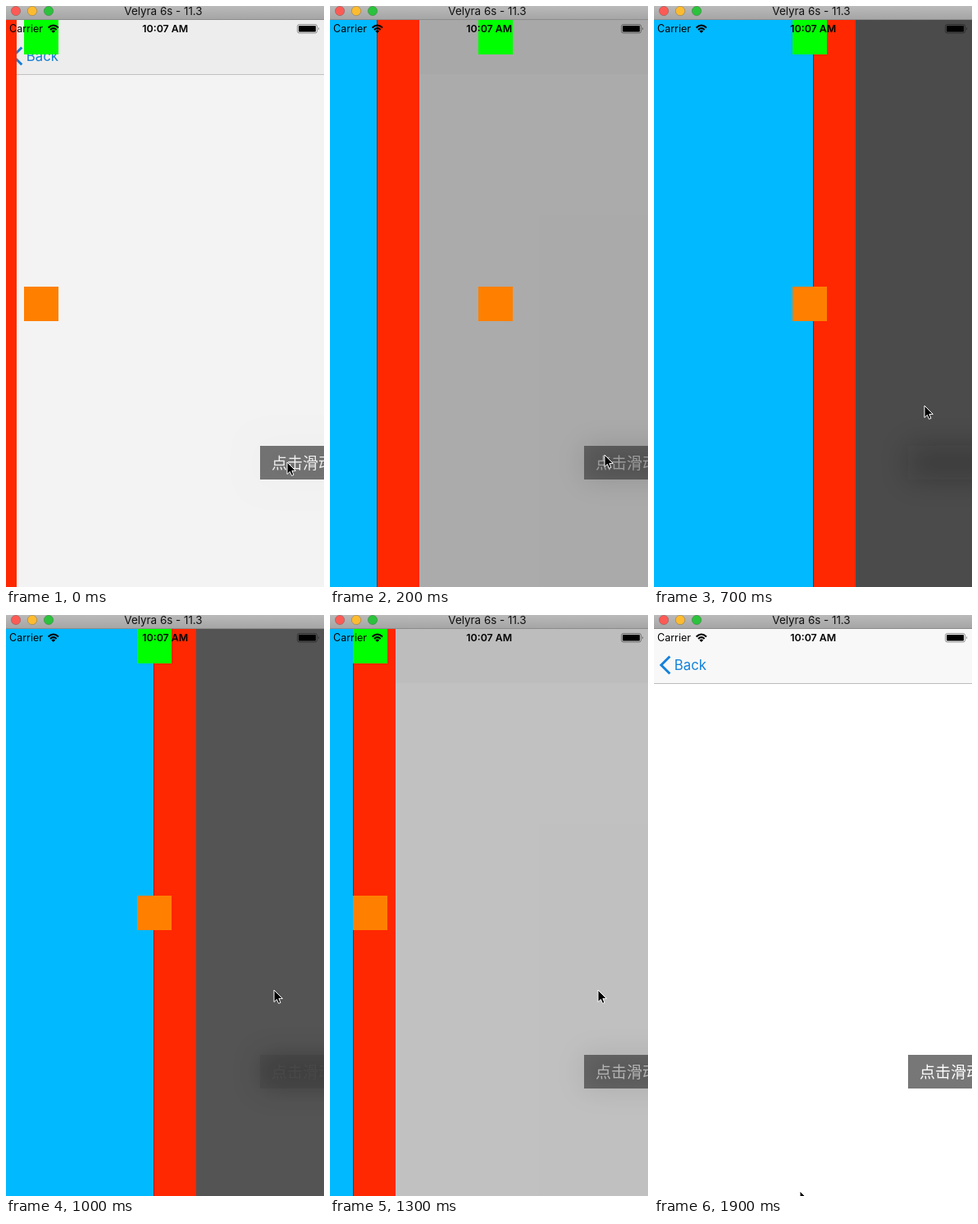
An HTML page for the animation above (2 s loop, 388 by 708 pixels).

```html
<!DOCTYPE html>
<html lang="en">
<head>
<meta charset="utf-8">
<title>Elastic drawer</title>
<style>
  html, body { margin: 0; width: 100%; height: 100%; overflow: hidden; background: #fff; }
  svg { display: block; width: 388px; height: 708px; }
  text { font-family: Inter, sans-serif; }
  .button-label { font: 19px "Noto Sans CJK SC", "Noto Sans CJK", sans-serif; }
</style>
</head>
<body>
<svg viewBox="0 0 388 708">
  <defs>
    <linearGradient id="chrome" x2="0" y2="1">
      <stop stop-color="#bababa"/>
      <stop offset="1" stop-color="#a4a4a4"/>
    </linearGradient>
    <filter id="soft" filterUnits="userSpaceOnUse" x="220" y="450" width="260" height="210">
      <feGaussianBlur stdDeviation="17"/>
    </filter>
  </defs>

  <rect width="388" height="708" fill="#fff"/>

  <g id="page">
    <rect y="17" width="388" height="66" fill="#f8f8f8"/>
    <rect id="hairline" y="83" width="388" height="1" fill="#bcbcbc"/>
    <path d="M19.3 50.5 8.8 61 19.3 71.5" fill="none" stroke="#1482dc" stroke-width="3"/>
    <text x="24.8" y="67" font-size="16.8" fill="#1482dc">Back</text>
    <rect x="310" y="536" width="90" height="41" fill="#777"/>
    <text class="button-label" x="324" y="564" fill="#fff">点击滑动</text>
  </g>

  <g id="dim">
    <rect y="17" width="388" height="691" fill="#4b4b4b"/>
    <rect id="shadow" x="310" y="536" width="130" height="41" fill="#111" filter="url(#soft)"/>
  </g>

  <g id="drawer">
    <rect x="-246" y="17" width="194" height="691" fill="#00b9ff"/>
    <rect x="-52" y="17" width="52" height="691" fill="#ff2800"/>
    <rect x="-52" y="17" width="1" height="691" fill="#000" opacity=".35"/>
  </g>

  <g id="helpers">
    <rect y="17" width="42" height="42" fill="#0f0"/>
    <rect y="342" width="42" height="42" fill="#ff8000"/>
  </g>

  <g id="status" fill="#000">
    <text x="4" y="32" font-size="12.5">Carrier</text>
    <path d="M51.6 26.4Q57.8 20.6 64 26.4M54 29Q57.8 25.4 61.6 29" fill="none" stroke="#000" stroke-width="2.1"/>
    <path d="M55.4 30.6Q57.8 28.6 60.2 30.6L57.8 33Z"/>
    <text x="194.3" y="32" font-size="12.4" font-weight="600" text-anchor="middle">10:07 AM</text>
    <rect x="355.5" y="22.5" width="24" height="10.5" rx="2.4" fill="none" stroke="#000" stroke-opacity=".4"/>
    <rect x="357" y="24" width="21" height="7.5" rx="1"/>
    <path d="M381 26Q383 27.7 381 29.5Z" opacity=".5"/>
  </g>

  <g id="title-bar">
    <rect width="388" height="17" fill="url(#chrome)"/>
    <rect y="16" width="388" height="1" fill="#8c8c8c"/>
    <g stroke="#000" stroke-opacity=".18">
      <circle cx="12" cy="6" r="5.7" fill="#fc5b55"/>
      <circle cx="32" cy="6" r="5.7" fill="#fdbb30"/>
      <circle cx="52" cy="6" r="5.7" fill="#2bc23c"/>
    </g>
    <text x="192" y="11" font-size="13.4" text-anchor="middle" fill="#111">Velyra 6s - 11.3</text>
  </g>

  <path id="cursor" d="M0 0V14.5L3.4 11.4 5.6 16.4 8 15.4 5.9 10.4H10.4Z" fill="#000" stroke="#fff"/>
</svg>

<script>
const LOOP = 2000, STEP = 100;
const DRAWER_WIDTH = 246, HELPER_TRAVEL = 215, HELPER_SIZE = 42;
const pointer = [
  [0, 343, 556], [200, 335, 547], [500, 335, 546], [800, 327, 457],
  [1300, 327, 457], [1500, 323, 458], [1600, 323, 459],
  [1800, 335, 503], [1900, 178, 702]
];
const [hairline, dim, shadow, drawer, helpers, cursor] =
  ['hairline', 'dim', 'shadow', 'drawer', 'helpers', 'cursor'].map(id => document.getElementById(id));

function ease(t, start, duration) {
  const p = Math.min(1, Math.max(0, (t - start) / duration));
  return (1 - Math.cos(Math.PI * p)) / 2;
}

// Step response of a spring with damping ratio 0.5
function spring(t, start) {
  const phase = 0.0082 * (t - start), root = Math.sqrt(0.75), angle = root * phase;
  return 1 - Math.exp(-phase / 2) * (Math.cos(angle) + Math.sin(angle) * 0.5 / root);
}

function pointerAt(t) {
  const i = Math.max(1, pointer.findIndex(k => k[0] >= t));
  const [t0, x0, y0] = pointer[i - 1], [t1, x1, y1] = pointer[i];
  const p = (t - t0) / (t1 - t0);
  return [x0 + (x1 - x0) * p, y0 + (y1 - y0) * p];
}

function move(node, x, y = 0) {
  node.setAttribute('transform', `translate(${Math.round(x)} ${Math.round(y)})`);
}

function fade(node, opacity) {
  node.setAttribute('opacity', Math.max(0, opacity).toFixed(3));
}

function draw(now) {
  const t = Math.floor(now % LOOP / STEP) * STEP;
  const closing = ease(t, 901, 649);
  const open = Math.max(0, ease(t, -91.5, 628) - closing);
  fade(dim, open ** 0.94);
  // The dimming layer also blurs: thin lines vanish and the button's shade spreads
  fade(hairline, 1 - 4 * open);
  fade(shadow, 1 - 0.75 * open);
  move(drawer, DRAWER_WIDTH * open);
  move(helpers, HELPER_TRAVEL * (spring(t, -112) - closing) - HELPER_SIZE);
  move(cursor, ...pointerAt(t));
}

const begin = performance.now();
function tick() {
  draw(performance.now() - begin);
  requestAnimationFrame(tick);
}
tick();
</script>
</body>
</html>
```
